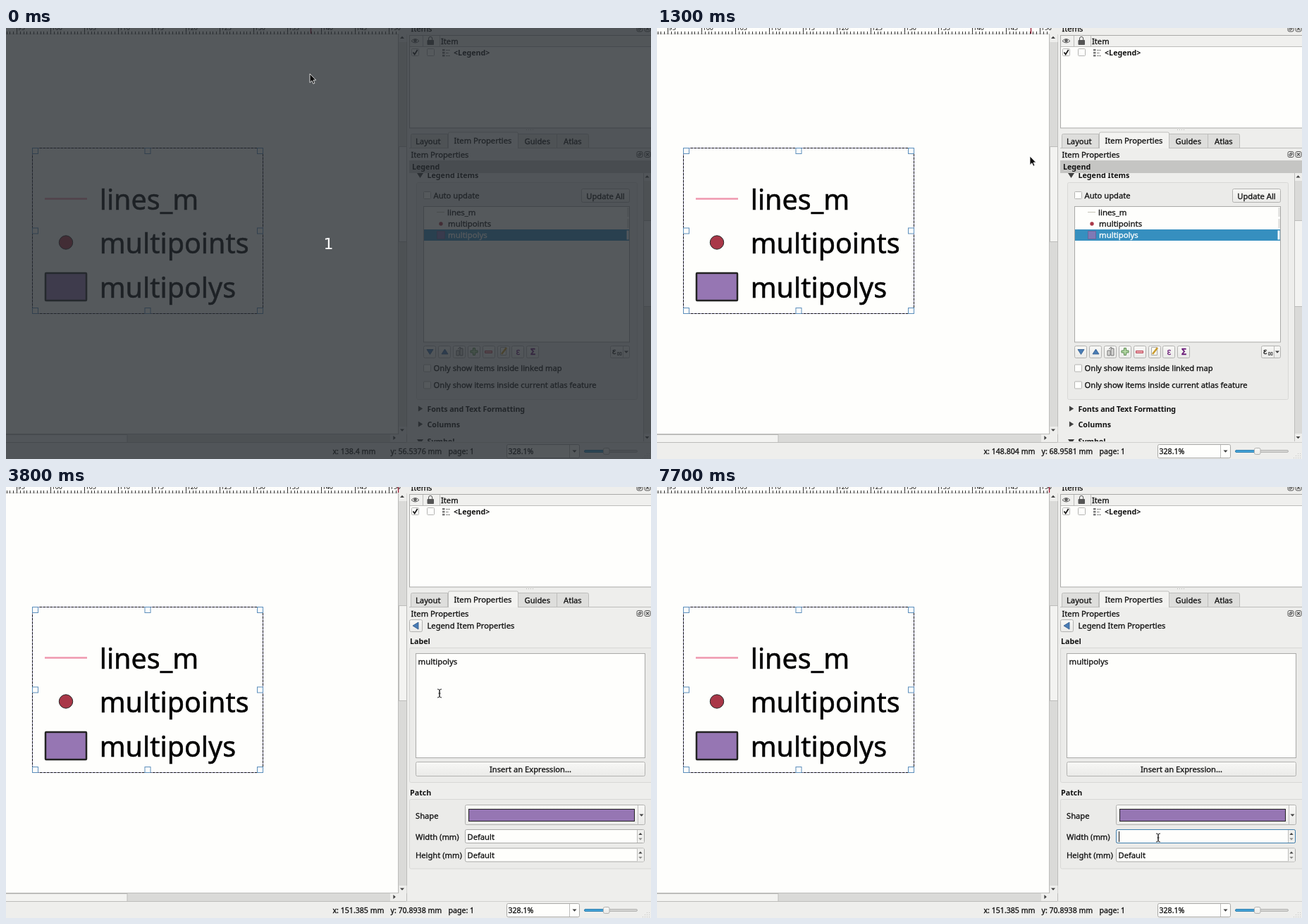
Animation, 915 px wide and 612 px high, one loop 8 s. Source, as an HTML page:

```html
<!DOCTYPE html>
<html lang="en">
<head>
<meta charset="utf-8">
<title>Legend item properties</title>
<style>
  html, body { margin: 0; width: 100%; height: 100%; overflow: hidden; background: #eeeeec; }
  svg { display: block; width: 915px; height: 612px; }
  text {
    font: 11.2px "Noto Sans", "Open Sans", sans-serif;
    color: #111; fill: currentColor; stroke: currentColor; stroke-width: .3px;
  }
  .b { font-size: 10.7px; font-weight: 700; stroke: none; }
  .list { font-size: 11.4px; }
  .stat { font-size: 10.6px; }
  .big { font-size: 39.5px; color: #000; stroke-width: .5px; }
  .mid { text-anchor: middle; }
  .tick { font-size: 9px; stroke: none; }
  .sym { font-size: 12px; color: #6a1a78; text-anchor: middle; }
  .on { color: #fff; }
  .count { font: 22px "DejaVu Sans", sans-serif; color: #fff; stroke: none; }
  .box { fill: #fefefc; stroke: #a9a9a7; }
  .chk { fill: #fefefc; stroke: #b4b4b2; }
  .btn { fill: url(#btn); stroke: #b2b2b0; }
  .group { fill: #ebebe9; stroke: #d8d8d6; }
  .groove { fill: #dadad8; }
  .grip { fill: #f3f3f1; stroke: #bcbcba; }
  .tab { fill: #dededc; stroke: #bdbdbb; }
  .dark { fill: #404040; }
  .blue { fill: #4a7db5; stroke: #2b568a; stroke-width: .8; }
  .thin { fill: none; stroke: #bdbdbb; }
  .icon { fill: none; stroke: #555; }
</style>
</head>
<body>
<svg viewBox="0 0 915 612">
  <defs>
    <linearGradient id="btn" x2="0" y2="1">
      <stop stop-color="#f8f8f6"/><stop offset="1" stop-color="#eaeae8"/>
    </linearGradient>
    <path id="down" d="M-3-1.6h6L0 1.8z"/>
    <path id="fold" d="M-4.5-3.5h9L0 3.5z"/>
    <rect id="chk" class="chk" x=".5" y=".5" width="10" height="10" rx="1"/>
    <rect id="tool" class="btn" x=".5" y=".5" width="17" height="17" rx="2"/>
    <rect id="knob" x="-4" y="-4" width="8" height="8" fill="#fefefc" stroke="#5a8dbb"/>
    <g id="dock" class="icon">
      <rect x="-4" y="-4" width="8" height="8" rx="2"/>
      <path d="M-2 2V-.5H.5V2zM-.5-.5V-2H2V.5H.5"/>
    </g>
    <g id="close" class="icon">
      <rect x="-4" y="-4" width="8" height="8" rx="2"/>
      <path d="M-2-2 2 2M2-2-2 2" stroke-width="1.3"/>
    </g>
    <g id="spin">
      <rect class="box" x=".5" y=".5" width="254" height="19" rx="2"/>
      <path d="M244 1h10v18h-10z" fill="#f0f0ee"/>
      <path class="thin" d="M244.5 1v18"/>
      <use href="#down" class="dark" transform="translate(249 6.5) scale(.9 -.9)"/>
      <use href="#down" fill="#8a8a88" transform="translate(249 14) scale(.9)"/>
    </g>
    <clipPath id="view"><path d="M572 206h343v381H572z"/></clipPath>
  </defs>

  <rect width="915" height="612" fill="#eeeeec"/>

  <!-- canvas, ruler and scroll bars -->
  <rect width="557" height="577" fill="#fefefc"/>
  <g id="ruler"></g>
  <path id="mark" d="M.5 0v8" stroke="#9c1d35" stroke-width="1.4"/>
  <path class="groove" d="M557 9h11v568h-11zM0 577h557v11H0z"/>
  <path class="thin" d="M556.5 9v568M568.5 9v579M0 576.5h557M0 588.5h568"/>
  <rect class="grip" x="557.5" y="168.5" width="11" height="135"/>
  <rect class="grip" x="-1" y="577.5" width="173" height="11"/>
  <path d="M557.5 9h11v11h-11zM557.5 566h11v11h-11zM545 577h12v11h-12z" fill="#eeeeec"/>
  <use href="#down" class="dark" transform="translate(562 13.5) scale(1 -1)"/>
  <use href="#down" class="dark" x="562" y="571"/>
  <use href="#down" class="dark" transform="translate(551 582) rotate(-90)"/>

  <!-- legend -->
  <path d="M55 242.5h60" stroke="#ef97ae" stroke-width="2.6"/>
  <circle cx="85" cy="304.5" r="9.7" fill="#a93748" stroke="#232323"/>
  <rect x="56" y="348" width="58" height="39" rx="1" fill="#9676b3" stroke="#232323" stroke-width="2.5"/>
  <text class="big" x="132.7" y="258">lines_m</text>
  <text class="big" x="132.7" y="320">multipoints</text>
  <text class="big" x="132.7" y="382.5">multipolys</text>
  <g fill="none">
    <path d="M37.5 170.5h327v235h-327z" stroke="#a9a6d6"/>
    <path d="M37.5 170.5h327v235h-327z" stroke="#16161c" stroke-dasharray="3.5 1.5"/>
  </g>
  <g id="knobs"></g>

  <!-- item list -->
  <text x="574.5" y="5">Items</text>
  <use href="#dock" x="899" y="1"/><use href="#close" x="910" y="1"/>
  <rect class="box" x="572.5" y="10.5" width="344" height="131.5"/>
  <path d="M573 11h342v15H573z" fill="#f0f0ee"/>
  <path class="thin" d="M573 26.5h342M591.5 11v15M615.5 11v15"/>
  <g class="icon">
    <path d="M575 18.5q5.5-6 11 0q-5.5 5-11 0z"/><circle cx="580.5" cy="18" r="1.8" fill="#666"/>
    <path d="M599.5 17v-2a2.6 2.6 0 0 1 5.2 0v2"/><path d="M598 17.5h8.5v6H598z" fill="#555"/>
  </g>
  <text x="617" y="22.5">Item</text>
  <use href="#chk" x="575" y="29"/><use href="#chk" x="597" y="29"/>
  <path d="M577.5 34.5l2.2 3 4-6.5" fill="none" stroke="#111" stroke-width="1.7"/>
  <path d="M619 30h3.5v2.5H619zM619 34h3.5v2.5H619zM619 38h3.5v2.5H619z" fill="#777"/>
  <path class="icon" d="M624.5 31.5h5M624.5 35.5h3.5M624.5 39.5h5" stroke-dasharray="2 1"/>
  <text class="b" x="635" y="39">&lt;Legend&gt;</text>
  <path d="M738 144.5h12" stroke="#b5b5b3" stroke-dasharray="1 2"/>

  <!-- tabs -->
  <path class="thin" d="M572 170.5h343"/>
  <path class="tab" d="M574.5 170.5v-18q0-2 2-2h50v20zM726.5 170.5v-20h55v20zM781.5 170.5v-20h43q2 0 2 2v18z"/>
  <path d="M627.5 171v-21q0-2 2-2h95q2 0 2 2v21" fill="#f3f3f1" stroke="#bdbdbb"/>
  <text x="581" y="164.5">Layout</text>
  <text x="635.5" y="164">Item Properties</text>
  <text x="735.5" y="164.5">Guides</text>
  <text x="791" y="164.5">Atlas</text>
  <text x="574.5" y="184">Item Properties</text>
  <use href="#dock" x="899" y="179.5"/><use href="#close" x="910" y="179.5"/>

  <!-- legend panel -->
  <g id="legend">
    <path d="M572 188h343v18H572z" fill="#c5c5c3"/>
    <text class="b" x="576" y="201">Legend</text>
    <g clip-path="url(#view)">
      <use href="#fold" class="dark" x="587.5" y="209.5"/>
      <text class="b" x="597.5" y="212.5">Legend Items</text>
      <rect class="group" x="582.5" y="219.5" width="313" height="308" rx="2"/>
      <use href="#chk" x="592" y="232"/>
      <text x="606.5" y="242">Auto update</text>
      <rect class="btn" x="816.5" y="228.5" width="68" height="19" rx="2"/>
      <text class="mid" x="850.5" y="242.5">Update All</text>
      <rect class="box" x="592.5" y="253.5" width="292" height="192.5"/>
      <path d="M881 255h3v13h-3zM881 271h3v13h-3z" fill="#e4e4e2"/>
      <path d="M593 286h291v16H593z" fill="#368fbf"/>
      <path d="M880.5 287.5h3v13h-3z" fill="#f5f8fa"/>
      <path d="M611 261.5h11" stroke="#c5c4b8"/>
      <circle cx="617" cy="278" r="2.7" fill="#a93748"/>
      <rect x="611.5" y="288.5" width="11" height="11" fill="#8079b5" stroke="#66679c"/>
      <text class="list" x="626" y="266">lines_m</text>
      <text class="list" x="627" y="282">multipoints</text>
      <text class="list on" x="627" y="298">multipolys</text>
      <g id="editor">
        <rect x="624.5" y="286.5" width="260" height="15" fill="#fefefc" stroke="#368fbf"/>
        <path d="M627 288h57v12h-57z" fill="#368fbf"/>
        <text class="list on" x="627" y="298">multipolys</text>
      </g>
      <g id="tools"></g>
      <use href="#fold" class="blue" x="601.5" y="460"/>
      <use href="#fold" class="blue" transform="translate(622.5 459.5) scale(1 -1)"/>
      <path d="M639 465v-7h4v7zM644 465v-10h4v10zM641 456l3-3 2 2" fill="#d5d5d3" stroke="#777"/>
      <path d="M662.5 454.5h3v3.5h3.5v3h-3.5v3.5h-3V461H659v-3h3.5z" fill="#b4d8a4" stroke="#5a8a50"/>
      <path d="M679.5 458.5h10v3h-10z" fill="#efa5ab" stroke="#b8485a"/>
      <path d="M701.5 453.5h8v11h-8z" fill="#fafaf0" stroke="#aaa"/>
      <path d="M703 463l7-9" stroke="#c99a2c" stroke-width="2.5"/>
      <text class="sym" x="726.5" y="464">ε</text>
      <text class="sym" x="747.5" y="464" font-weight="700" style="font-weight:700">Σ</text>
      <rect class="btn" x="857.5" y="451.5" width="27" height="17" rx="2"/>
      <path class="thin" d="M875.5 452v16"/>
      <text x="860" y="463">ε</text>
      <path class="icon" d="M867.5 460.5h2v4h-2zM871 460.5h2v4h-2z"/>
      <use href="#down" class="dark" x="880" y="460"/>
      <use href="#chk" x="592" y="477.5"/>
      <text x="606.5" y="487">Only show items inside linked map</text>
      <use href="#chk" x="592" y="501.5"/>
      <text x="606.5" y="511">Only show items inside current atlas feature</text>
      <use href="#fold" class="dark" transform="translate(588 540.5) rotate(-90) scale(.9)"/>
      <text class="b" x="597.5" y="545" letter-spacing="-.1">Fonts and Text Formatting</text>
      <use href="#fold" class="dark" transform="translate(588 562.5) rotate(-90) scale(.9)"/>
      <text class="b" x="597.5" y="567">Columns</text>
      <use href="#fold" class="dark" x="587.5" y="587.5"/>
      <text class="b" x="597.5" y="591">Symbol</text>
      <path class="groove" d="M904 206h11v381h-11z"/>
      <path d="M904 206h11v11h-11zM904 576h11v11h-11z" fill="#eeeeec"/>
      <rect class="grip" x="904.5" y="273.5" width="11" height="122"/>
      <path class="thin" d="M904.5 206v381"/>
      <use href="#down" class="dark" transform="translate(909.5 211) scale(1 -1)"/>
      <use href="#down" class="dark" x="909.5" y="581.5"/>
    </g>
  </g>

  <!-- legend item panel -->
  <g id="item">
    <rect class="btn" x="572.5" y="188.5" width="18" height="17" rx="2"/>
    <path class="blue" d="M577 197l8-5v10z"/>
    <text x="597.5" y="201">Legend Item Properties</text>
    <text class="b" x="573" y="223">Label</text>
    <rect class="group" x="572.5" y="228.5" width="345" height="191" rx="2"/>
    <rect class="box" x="581.5" y="236.5" width="325" height="148"/>
    <text class="list" x="584.5" y="252">multipolys</text>
    <rect class="btn" x="581.5" y="390.5" width="325" height="20" rx="2"/>
    <text class="mid" x="744" y="404.5">Insert an Expression...</text>
    <text class="b" x="573" y="438">Patch</text>
    <rect class="group" x="572.5" y="443.5" width="345" height="98.5" rx="2"/>
    <text x="581" y="470.5">Shape</text>
    <rect class="btn" x="651.5" y="451.5" width="255" height="28" rx="2"/>
    <path class="thin" d="M896.5 452v28"/>
    <rect x="656.5" y="457.5" width="235" height="17" fill="#9676b3" stroke="#232323"/>
    <use href="#down" class="dark" x="901.5" y="466"/>
    <text x="581" y="500.5">Width (mm)</text>
    <use href="#spin" x="651" y="486"/>
    <text id="width" x="654.5" y="500.5">Default</text>
    <rect id="focus" x="651.5" y="486.5" width="254" height="19" rx="2" fill="none" stroke="#3f7fae"/>
    <path id="caret" d="M655.5 489v15" stroke="#111"/>
    <text x="581" y="527">Height (mm)</text>
    <use href="#spin" x="651" y="512.5"/>
    <text x="654.5" y="527">Default</text>
  </g>

  <!-- status bar -->
  <path class="thin" d="M0 588.5h915" opacity=".6"/>
  <text class="stat" id="posX" x="463.5" y="605"></text>
  <text class="stat" id="posY" x="545.5" y="605"></text>
  <text class="stat" x="627.5" y="605">page: 1</text>
  <rect class="box" x="710.5" y="591.5" width="103" height="19" rx="2"/>
  <path class="thin" d="M799.5 592v18"/>
  <text class="stat" x="712.5" y="605">328.1%</text>
  <use href="#down" class="dark" x="806.5" y="601"/>
  <rect x="820.5" y="599.5" width="75" height="3" rx="1.5" fill="#d4d4d2" stroke="#b4b4b2"/>
  <rect x="820.5" y="599.5" width="30" height="3" rx="1.5" fill="#45a3d8" stroke="#2f7fae"/>
  <rect class="btn" x="847.5" y="596.5" width="8.5" height="9" rx="2"/>
  <path d="M903 610.5h11M906 607.5h8M909 604.5h5" stroke="#c2c2c0" stroke-dasharray="1 2"/>

  <!-- countdown -->
  <g id="count">
    <rect width="915" height="612" fill="rgb(38,43,48)" fill-opacity=".78"/>
    <text class="mid count" x="457.5" y="314">1</text>
  </g>

  <g id="pointer">
    <path id="arrow" d="M0-1V11.5L2.900 8.800 4.900 13.200 6.900 12.300 5 8H8.700z"
      fill="#0c0c0c" stroke="#fff" stroke-width=".8"/>
    <g id="beam" fill="none">
      <path d="M-3-6q3 0 3 2v8q0 2-3 2M3-6q-3 0-3 2v8q0 2 3 2" stroke="#fff" stroke-width="2.4"/>
      <path d="M-3-6q3 0 3 2v8q0 2-3 2M3-6q-3 0-3 2v8q0 2 3 2M-1.5 0h3" stroke="#222"/>
    </g>
  </g>
</svg>
<script>
const LOOP = 8000, STEP = 100;
const $ = id => document.getElementById(id);
const show = (id, on) => $(id).setAttribute('visibility', on ? 'inherit' : 'hidden');

// pointer path: time, x, y
const path = [
  [500, 431, 66], [600, 432, 67], [700, 437, 73], [800, 447, 86], [900, 463, 106],
  [1200, 517, 169], [1300, 529, 183], [1400, 536, 189], [1500, 539, 191], [1600, 548, 198],
  [1700, 572, 219], [1800, 603, 255], [1900, 620, 279], [2000, 620, 279], [2100, 619, 282],
  [2200, 616, 288], [2300, 614, 292], [3700, 614, 292], [3800, 615, 293], [4600, 615, 293],
  [4700, 615, 296], [4800, 617, 305], [4900, 621, 322], [5200, 643, 394], [5300, 652, 415],
  [5500, 668, 449], [5600, 668, 449], [5700, 669, 451], [5900, 682, 467], [6100, 703, 488],
  [6200, 709, 495], [6300, 711, 498]
];

function pointAt(t) {
  const i = path.findIndex(p => p[0] >= t);
  if (i === 0) return path[0].slice(1);
  if (i < 0) return path[path.length - 1].slice(1);
  const [t0, x0, y0] = path[i - 1], [t1, x1, y1] = path[i];
  const k = (t - t0) / (t1 - t0);
  return [x0 + (x1 - x0) * k, y0 + (y1 - y0) * k];
}

function build() {
  let ruler = '<path d="M0 8.5h557" stroke="#d0d0ce"/>';
  for (let i = -3; i < 113; i++) {
    const x = 15 + i * 4.8, major = i % 10 === 0;
    ruler += `<path d="M${Math.round(x) + .5} ${major ? 0 : 5}V9" stroke="#333"/>`;
    if (major) ruler += `<text class="tick" x="${x + 1.5}" y="3">${95 + i / 2}</text>`;
  }
  $('ruler').innerHTML = ruler;

  let knobs = '';
  for (const x of [41.5, 201, 360.5])
    for (const y of [174.5, 288, 401.5])
      if (x !== 201 || y !== 288) knobs += `<use href="#knob" x="${x}" y="${y}"/>`;
  $('knobs').innerHTML = knobs;

  let tools = '';
  for (let i = 0; i < 8; i++)
    tools += `<use href="#tool" x="${Math.round(592 + i * 20.9)}" y="451"/>`;
  $('tools').innerHTML = tools;
}

function draw(now) {
  const t = now % LOOP;
  const [x, y] = pointAt(Math.floor(t / STEP) * STEP);
  const inItem = t >= 3800, typing = t >= 6600;

  show('count', t < 300);
  show('legend', !inItem);
  show('editor', t >= 3500 && !inItem);
  show('item', inItem);
  show('width', !typing);
  show('focus', typing);
  show('caret', typing && (t < 7100 || t >= 7700));

  const beam = inItem && (y < 385 || y > 486);
  show('beam', beam);
  show('arrow', !beam);
  $('pointer').setAttribute('transform', `translate(${x} ${y})`);

  // the readout freezes where the pointer leaves the canvas
  const dx = Math.min(x - 431, 122.31);
  const dy = x - 431 > 122.31 ? 135.234 : y - 66;
  $('mark').setAttribute('transform', `translate(${Math.min(x + 1, 556)} 0)`);
  $('posX').textContent = `x: ${+(138.4 + dx * .106163).toPrecision(6)} mm`;
  $('posY').textContent = `y: ${+(56.5376 + dy * .106158).toPrecision(6)} mm`;
}

build();
const start = performance.now();
(function tick() {
  draw(performance.now() - start);
  requestAnimationFrame(tick);
})();
</script>
</body>
</html>
```
